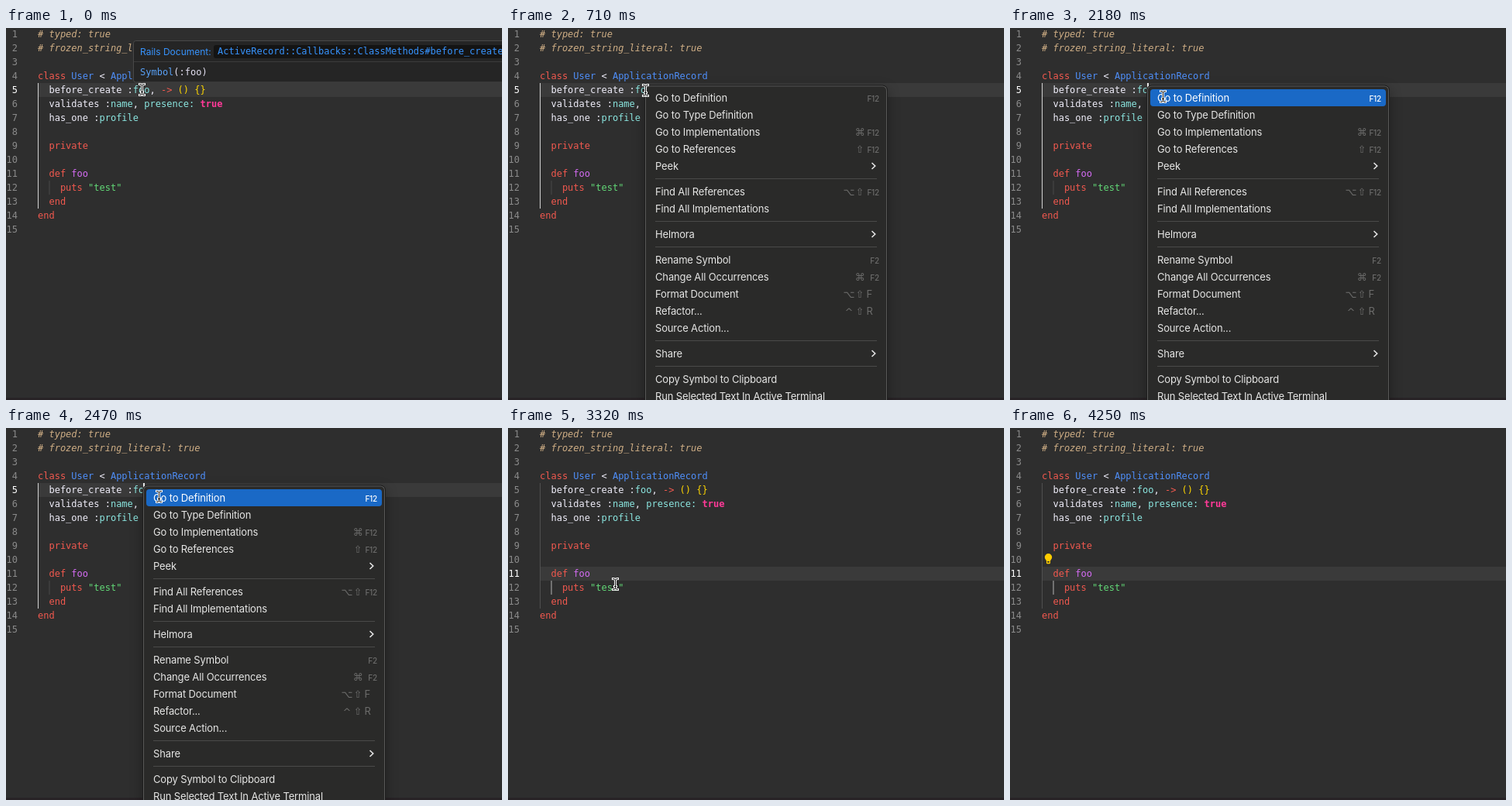
An HTML page with a canvas for the animation above (5200 ms loop, 640 by 480 pixels).

```html
<!DOCTYPE html>
<html lang="en">
<head>
<meta charset="utf-8">
<title>Go to Definition</title>
<style>
html, body { margin: 0; width: 100%; height: 100%; overflow: hidden; background: #2e2e2e; }
canvas { display: block; width: 640px; height: 480px; }
</style>
</head>
<body>
<canvas id="stage" width="640" height="480"></canvas>
<script>
const ctx = document.getElementById('stage').getContext('2d');
const LOOP = 5200;
const MONO = '"DejaVu Sans Mono", monospace';
const SANS = 'Inter, sans-serif';
const CH = 7.224, LEFT = 41;

const C = {
  bg: '#2e2e2e', row: '#3a3a3a', num: '#8a8a8a', text: '#f0eefa', note: '#cfae85',
  key: '#f2594f', type: '#4f8ffa', sym: '#8be6e0', lit: '#ff3a98', gold: '#ffd700',
  str: '#62d977', fn: '#d46cf3', link: '#3794ff'
};

// Each line: indent in columns, then [text, colour] runs.
const code = [
  [0, ['# typed: true', 'note']],
  [0, ['# frozen_string_literal: true', 'note']],
  [0],
  [0, ['class ', 'key'], ['User', 'type'], [' < ', 'text'], ['ApplicationRecord', 'type']],
  [2, ['before_create :', 'text'], ['foo', 'sym'], [', ', 'text'], ['-> ', 'key'], ['() {}', 'gold']],
  [2, ['validates :', 'text'], ['name', 'sym'], [', ', 'text'], ['presence:', 'sym'], [' ', 'text'], ['true', 'lit']],
  [2, ['has_one ', 'text'], [':', 'text'], ['profile', 'sym']],
  [0],
  [2, ['private', 'key']],
  [0],
  [2, ['def ', 'key'], ['foo', 'fn']],
  [4, ['puts ', 'key'], ['"test"', 'str']],
  [2, ['end', 'key']],
  [0, ['end', 'key']],
  [0]
];

// Groups of [label, shortcut]; '>' marks a submenu.
const menu = [
  [['Go to Definition', 'F12'], ['Go to Type Definition'], ['Go to Implementations', '⌘ F12'],
   ['Go to References', '⇧ F12'], ['Peek', '>']],
  [['Find All References', '⌥⇧ F12'], ['Find All Implementations']],
  [['Helmora', '>']],
  [['Rename Symbol', 'F2'], ['Change All Occurrences', '⌘ F2'], ['Format Document', '⌥⇧ F'],
   ['Refactor...', '^⇧ R'], ['Source Action...']],
  [['Share', '>']],
  [['Copy Symbol to Clipboard'], ['Run Selected Text In Active Terminal']]
];

// Pointer path: time, x, y
const path = [
  [0, 175, 79], [590, 175, 79], [850, 180, 81], [1110, 186, 83], [1290, 190, 85],
  [1460, 197, 88], [2640, 197, 88], [2810, 190, 94], [2920, 164, 115], [3100, 145, 160],
  [3320, 138, 201], [3490, 139, 226], [3550, 142, 227], [3780, 320, 330], [4010, 542, 496]
];

const within = (t, a, b) => t >= a && t < b;
const rowTop = n => 18 * n - 19;

function rect(x, y, w, h, fill) {
  ctx.fillStyle = fill;
  ctx.fillRect(x, y, w, h);
}

function round(x, y, w, h, r, fill) {
  ctx.beginPath();
  ctx.roundRect(x, y, w, h, r);
  ctx.fillStyle = fill;
  ctx.fill();
}

function label(str, x, y, fill, font, align = 'left', gap = 0) {
  ctx.font = font;
  ctx.textAlign = align;
  ctx.letterSpacing = gap + 'px';
  ctx.fillStyle = fill;
  ctx.fillText(str, x, y);
}

function pointerAt(t) {
  const i = path.findIndex(p => p[0] > t);
  if (i < 0) return path[path.length - 1].slice(1);
  const [t0, x0, y0] = path[i - 1], [t1, x1, y1] = path[i];
  const k = (t - t0) / (t1 - t0);
  return [x0 + (x1 - x0) * k, y0 + (y1 - y0) * k];
}

function drawEditor(t) {
  const jumped = t >= 2720;
  const active = jumped ? 11 : 5;
  rect(0, 0, 640, 480, C.bg);
  rect(0, 477, 640, 3, '#282326');
  rect(LEFT, rowTop(active), 599, 18, C.row);

  if (within(t, 2720, 3090)) {
    [[11, 7], [12, 13], [13, 5]].forEach(([n, end]) =>
      rect(55, rowTop(n), LEFT + end * CH + 2 * CH - 55 - 2 * CH + (n === 11 ? 2 * CH : n === 12 ? 2 * CH : 0), 18, '#75432d'));
  }

  rect(LEFT, rowTop(5), 1, 162, jumped ? '#505050' : '#d2d2d2');
  rect(55.5, rowTop(12), 1, 18, jumped ? '#b4b4b4' : '#484848');

  code.forEach(([indent, ...runs], i) => {
    const y = 18 * i + 12;
    label(i + 1, 15, y, i + 1 === active ? '#ffffff' : C.num, '12px ' + MONO, 'right');
    let col = indent;
    for (const [str, tone] of runs) {
      const style = tone === 'note' ? 'italic ' : tone === 'lit' ? 'bold ' : '';
      label(str, LEFT + col * CH, y, C[tone], style + '12px ' + MONO);
      col += str.length;
    }
  });

  if (within(t, 230, 560) || within(t, 1110, 1640) || within(t, 2180, 2720)) {
    rect(177, 71, 2, 18, '#f0f0f0');
  }
  if (within(t, 2720, 3210) || within(t, 3730, 4250)) rect(54, 179, 2, 18, '#f0f0f0');
  if (t >= 4130) drawBulb();
}

function drawBulb() {
  ctx.fillStyle = '#ffcc00';
  ctx.beginPath();
  ctx.arc(49.5, 166.7, 4.7, Math.PI * 0.75, Math.PI * 2.25);
  ctx.lineTo(51.8, 172);
  ctx.lineTo(47.2, 172);
  ctx.fill();
  round(47, 171, 5, 4.2, 1.2, '#ffcc00');
  rect(48.2, 172, 2.6, 1.6, C.bg);
}

function drawHover() {
  round(164.5, 16.5, 500, 53.5, 3, '#252525');
  ctx.strokeStyle = '#484848';
  ctx.lineWidth = 1;
  ctx.stroke();
  rect(165, 43, 475, 1, '#3c3c3c');
  label('Rails Document:', 173, 35, C.link, '12px ' + SANS);
  round(268, 22, 400, 17, 3, '#141414');
  label('ActiveRecord::Callbacks::ClassMethods#before_create', 273, 34, C.link, '12px ' + MONO);
  label('Symbol', 173, 61, '#58a0f5', '12px ' + MONO);
  label('(:foo)', 173 + 6 * CH, 61, '#e4e0f2', '12px ' + MONO);
}

function drawShortcut(keys, y, lit) {
  const tone = lit ? '#ffffff' : '#6c6c6b';
  if (keys === '>') {
    ctx.strokeStyle = '#e4e4e4';
    ctx.lineWidth = 1.6;
    ctx.beginPath();
    ctx.moveTo(469.5, y - 4);
    ctx.lineTo(473.7, y);
    ctx.lineTo(469.5, y + 4);
    ctx.stroke();
    return;
  }
  const parts = keys.split(' ');
  const name = parts.pop();
  if (name.length > 1) label(name, 479, y + 4.5, tone, '500 10px ' + SANS, 'right', -0.2);
  else label(name, 462.5, y + 4.7, tone, '13px ' + SANS);
  [...(parts[0] || '')].reverse().forEach((k, i) =>
    label(k, 454 - 14 * i, y + (k === '^' ? 6 : 4.5), tone, '13px "DejaVu Sans", sans-serif', 'center'));
}

function drawMenu(t, mx) {
  ctx.save();
  ctx.globalAlpha = t < 2580 ? 1 : Math.max(0, 1 - (t - 2580) / 130);
  ctx.shadowColor = 'rgba(0,0,0,0.3)';
  ctx.shadowBlur = 16;
  ctx.shadowOffsetY = 5;
  round(176, 73.5, 314, 430, 7, '#1c1c1c');
  ctx.shadowColor = 'transparent';
  round(177, 74.5, 312, 430, 6, '#595958');
  round(178, 75.5, 310, 430, 5, '#2a2a29');

  const hot = mx >= 181 && !within(t, 2410, 2470);
  let y = 90;
  menu.forEach((group, g) => {
    group.forEach(([name, keys], i) => {
      const lit = hot && g === 0 && i === 0;
      if (lit) round(181, 79, 304, 22, 4, '#1a69c6');
      label(name, 190, y + 4.7, lit ? '#ffffff' : '#e6e6e5', '13px ' + SANS, 'left', -0.15);
      if (keys) drawShortcut(keys, y, lit);
      y += 22;
    });
    rect(190, y - 6, 286, 1, '#4a4a49');
    y += 11;
  });
  ctx.restore();
}

function drawPointer(x, y) {
  ctx.save();
  ctx.translate(Math.round(x) + 0.5, Math.round(y) + 0.5);
  ctx.lineCap = 'square';
  for (const [width, tone] of [[3, '#ffffff'], [1, '#111111']]) {
    ctx.lineWidth = width;
    ctx.strokeStyle = tone;
    ctx.beginPath();
    for (const s of [-1, 1]) {
      ctx.moveTo(-3, 7 * s);
      ctx.quadraticCurveTo(0, 7 * s, 0, 5 * s);
      ctx.quadraticCurveTo(0, 7 * s, 3, 7 * s);
    }
    ctx.moveTo(0, -5);
    ctx.lineTo(0, 5);
    ctx.moveTo(-1, 3);
    ctx.lineTo(1, 3);
    ctx.stroke();
  }
  ctx.restore();
}

function frame(now) {
  const t = now % LOOP;
  const [mx, my] = pointerAt(t);
  drawEditor(t);
  if (t < 180) drawHover();
  if (within(t, 230, 2710)) drawMenu(t, mx);
  if (t < 4010) drawPointer(mx, my);
  requestAnimationFrame(frame);
}

requestAnimationFrame(frame);
</script>
</body>
</html>
```
